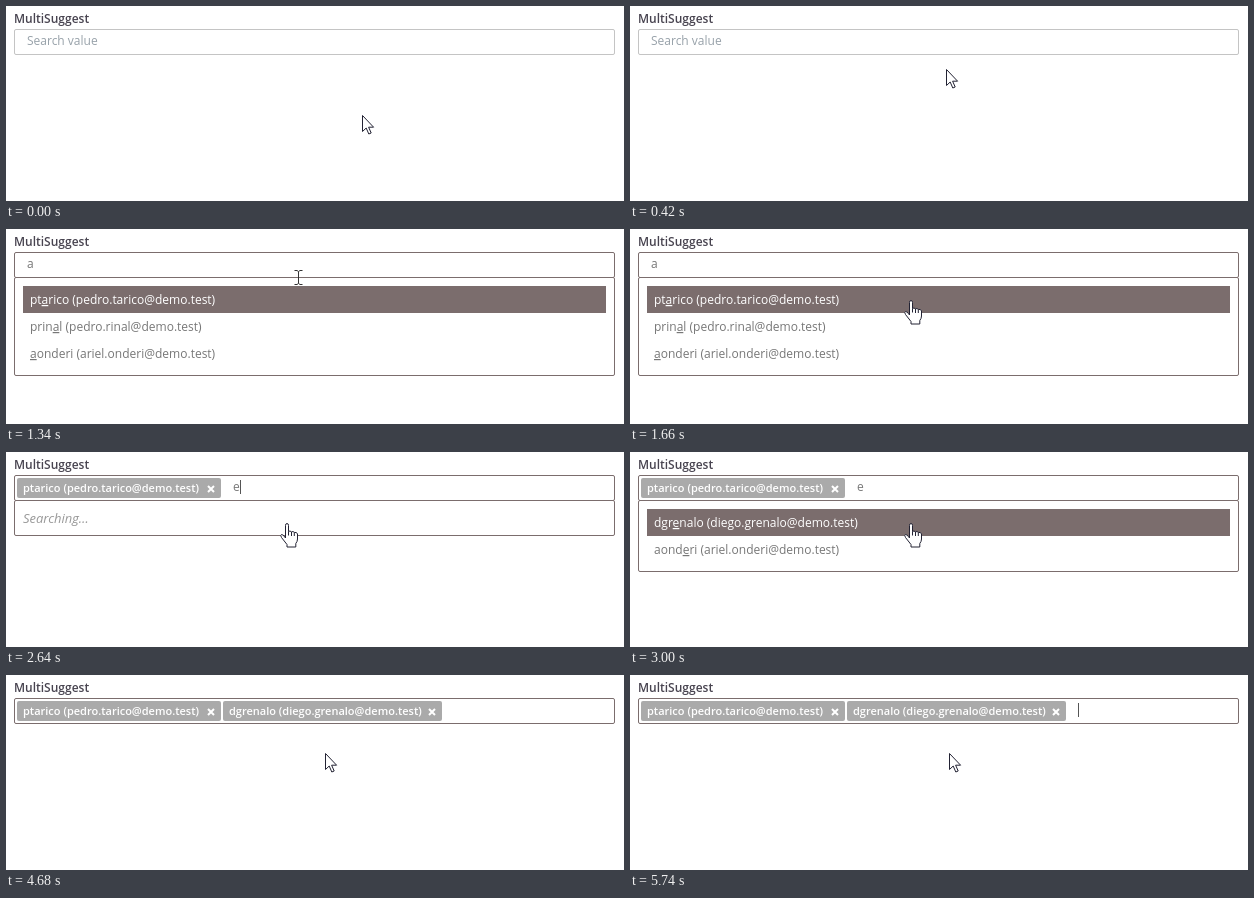
Animation, 618 px wide and 195 px high, one loop 6.04 s. Source, as an HTML page:

```html
<!DOCTYPE html>
<html lang="en">
<head>
<meta charset="utf-8">
<title>MultiSuggest</title>
<style>
html, body { margin: 0; width: 100%; height: 100%; overflow: hidden; background: #fff; }
svg { display: block; font: 12px "Open Sans", sans-serif; fill: #777; }
.label { font-weight: 600; fill: #484450; }
.placeholder { fill: #97a1a9; }
.searching { font-size: 13px; font-style: italic; }
.chip { font-size: 11px; font-weight: 600; fill: #fff; }
.match { text-decoration: underline; }
</style>
</head>
<body>
<svg id="stage" width="618" height="195" viewBox="0 0 618 195"></svg>
<script>
const LOOP = 6040;
const DARK = '#7b6d6d';
const users = {
  tarico: 'ptarico (pedro.tarico@demo.test)',
  rinal: 'prinal (pedro.rinal@demo.test)',
  onderi: 'aonderi (ariel.onderi@demo.test)',
  grenalo: 'dgrenalo (diego.grenalo@demo.test)'
};
const stage = document.getElementById('stage');

const text = (x, y, content, cls = '', fill = '') =>
  `<text x="${x}" y="${y}" class="${cls}"${fill && ` style="fill:${fill}"`}>${content}</text>`;
const rect = (x, y, w, h, fill, extra = '') =>
  `<rect x="${x}" y="${y}" width="${w}" height="${h}" fill="${fill}" ${extra}/>`;
const frame = (y, h, color) => rect(8.5, y + .5, 600, h, '#fff', `rx="1.5" stroke="${color}"`);
const between = (t, from, to) => t >= from && t < to;

function chip(x, width, user) {
  const cross = x + width - 13;
  return rect(x, 26, width, 20, '#aaa', 'rx="2"') + text(x + 6, 40, user, 'chip') +
    `<path d="M${cross} 34l6 6m0-6l-6 6" stroke="#fff" stroke-width="2"/>`;
}

function results(list, letter) {
  const rows = list.map((user, i) => {
    const marked = user.replace(letter, `<tspan class="match">${letter}</tspan>`);
    return text(24, 75 + 27 * i, marked, '', i ? '' : '#fff');
  });
  return frame(48, 17 + 27 * list.length, DARK) + rect(17, 57, 583, 27, DARK) + rows.join('');
}

const searching = color => frame(48, 35, DARK) + text(17, 71, 'Searching…', 'searching', color);

// Pointer moves: start, end, from x, y, to x, y
const moves = [
  [200, 560, 356, 109, 296, 40],
  [1220, 1600, 296, 40, 281, 72],
  [3980, 4160, 281, 72, 319, 78]
];

function pointerAt(t) {
  const [start, end, x0, y0, x1, y1] = moves.findLast(m => t >= m[0]) || moves[0];
  const p = Math.min(1, Math.max(0, (t - start) / (end - start)));
  const k = p * p * (3 - 2 * p);
  return [Math.round(x0 + (x1 - x0) * k), Math.round(y0 + (y1 - y0) * k)];
}

function pointer(t) {
  const [x, y] = pointerAt(t);
  const outline = 'fill="#fff" stroke="#223" stroke-linejoin="round"';
  let shape = `<path d="M.5.5v16l3.7-3.5 2.6 6 2.4-1-2.6-5.8h5z" ${outline}/>`;
  if (y < 49) {
    shape = '<path d="M-3.5-6.5h2.5l1.5 1 1.5-1h2.5M.5-5.5v12M-3.5 7.5h2.5l1.5-1 1.5 1h2.5" fill="none" stroke="#333"/>';
  } else if (y >= 57 && t < 3980 && t > 1000) {
    shape = `<path d="M-1.5 14V1.5q0-2 1.5-2t1.5 2v6q1.5-1.2 3 .4 1.7-1 2.8.5 2.7-.5 3.2 1.6v5q0 2.500-1.700 4.500v3.500h-8.800v-2.500L-5.500 13.500q-1.500-2.300 0-3 1.500-.4 4 3.500M1.500 7.500v4M4.500 8v4M7.300 8.500v3.500" ${outline}/>`;
  }
  return `<g transform="translate(${x} ${y})">${shape}</g>`;
}

const caretSpans = [
  [600, 1260], [1800, 2120], [2380, 2900],
  [3260, 3520], [3640, 3980], [4320, 4680], [5040, 5380], [5740, LOOP]
];

function scene(t) {
  const focused = t >= 560;
  const typed = between(t, 740, 1780) ? 'a' : between(t, 2380, 3620) ? 'e' : '';
  const inputX = t < 1780 ? 21 : t < 3620 ? 227 : 448;
  let out = text(8, 17, 'MultiSuggest', 'label');

  if (between(t, 740, 1000)) out += searching('#7893a5');
  if (between(t, 1000, 1780)) out += results([users.tarico, users.rinal, users.onderi], 'a');
  if (between(t, 2380, 2660)) out += searching('#999');
  if (between(t, 2660, 3620)) out += results([users.grenalo, users.onderi], 'e');

  out += frame(23, 25, focused ? DARK : '#c4c4c4');
  if (t >= 1780) out += chip(11, 204, users.tarico);
  if (t >= 3620) out += chip(217, 219, users.grenalo);
  out += focused ? text(inputX, 39, typed) : text(21, 39, 'Search value', 'placeholder');
  if (caretSpans.some(([from, to]) => between(t, from, to))) {
    out += rect(inputX + (typed ? 7 : 0), 28, 1, 14, '#555');
  }
  return out + pointer(t);
}

function draw() {
  stage.innerHTML = scene(performance.now() % LOOP);
  requestAnimationFrame(draw);
}
draw();
</script>
</body>
</html>
```
